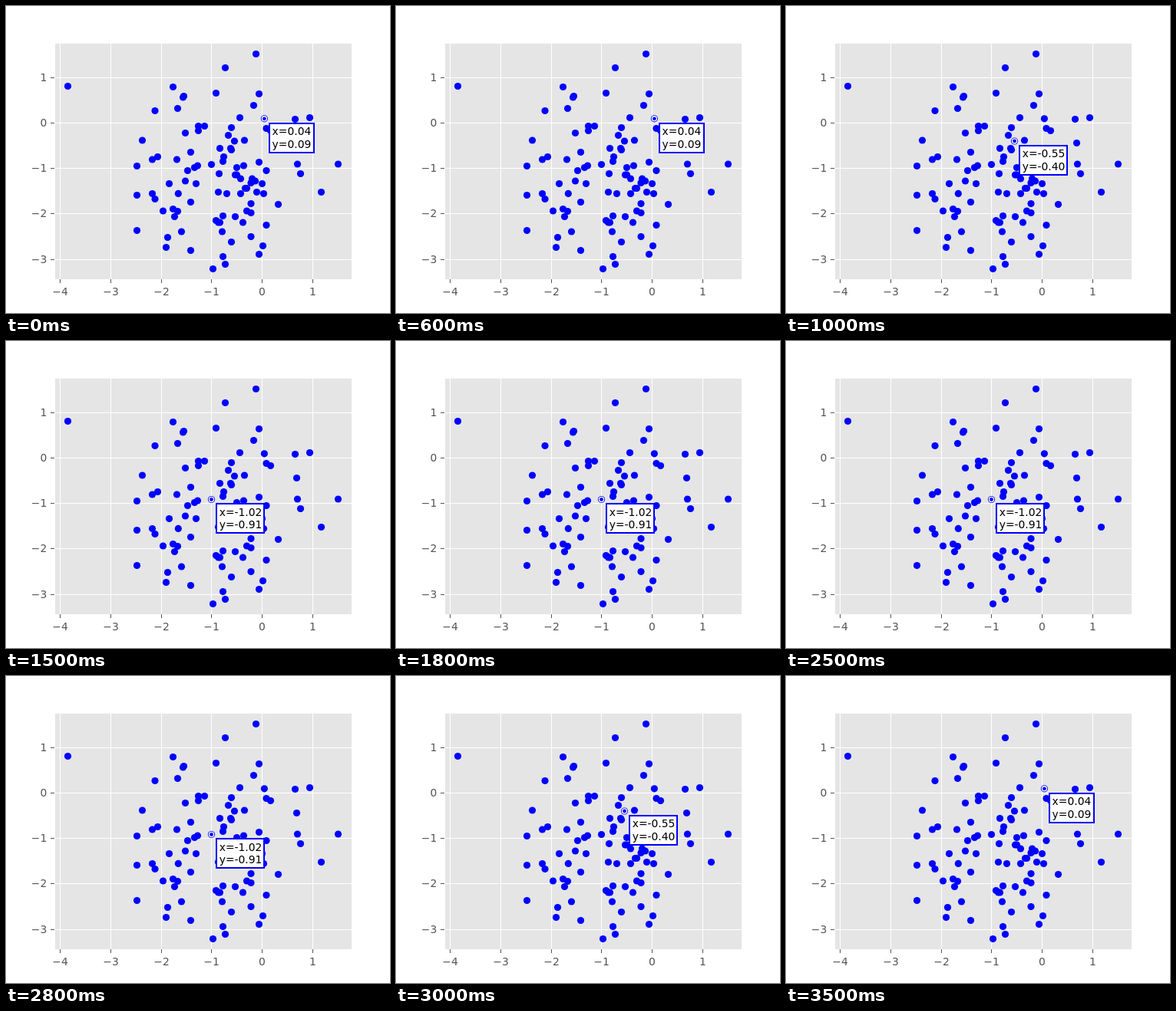
These frames come from a looping animation (500 by 400 pixels, 4000 ms). An HTML page with a canvas:

```html
<!DOCTYPE html>
<html lang="en">
<head>
<meta charset="utf-8">
<title>Scatter plot with a moving data tip</title>
<style>
html, body { margin: 0; width: 100%; height: 100%; overflow: hidden; background: #fff; }
canvas { display: block; }
</style>
</head>
<body>
<canvas id="stage" width="500" height="400"></canvas>
<script>
const ctx = document.getElementById("stage").getContext("2d");
const FONT = '13.89px "DejaVu Sans", sans-serif';
const BLUE = "#00f", GREY = "#555";

// Dots that share a height: y, then every x.
const rows = [
  [62, 325], [104, 80], [113, 273], [117, 231], [118.5, 230], [129, 322],
  [145, 304, 395], [147, 376], [156, 250, 258], [162, 250, 344],
  [165, 233], [168, 289], [174.5, 177, 310], [178, 378], [185, 278, 292],
  [196, 197, 283], [199.5, 190, 222], [205.5, 379, 432], [207.5, 249, 309],
  [210, 245, 300], [214, 236], [218, 277, 383], [219.5, 298, 300],
  [224.5, 305, 320], [227.5, 233, 324], [231, 212, 247, 333],
  [237, 311, 313], [242, 410, 276, 326], [244, 190, 305, 335, 287],
  [258, 354], [266.5, 204, 313], [274, 219, 298], [279, 273],
  [281.5, 276, 278, 308], [293.5, 281, 228], [301, 210], [312, 334],
  [314, 208], [342, 269]
];

// Dots that share a column: x, then every y.
const columns = [
  [285, 80, 336], [240, 190, 255, 318], [282, 202, 273, 326],
  [293, 158, 187, 307], [223, 133, 267], [318.5, 230, 257, 269, 300],
  [193.5, 136, 251], [217, 105, 264], [329, 114, 203, 323],
  [338.5, 159, 214, 285], [170, 208, 246, 292]
];

// Dots visited by the data tip.
const picks = [
  { x: 336.4, y: 146.8, label: ["x=0.04", "y=0.09"], width: 60 },
  { x: 297.5, y: 176, label: ["x=-0.55", "y=-0.40"], width: 64 },
  { x: 267.5, y: 206.5, label: ["x=-1.02", "y=-0.91"], width: 64 },
  { x: 224.3, y: 244.4, label: ["x=-1.67", "y=-1.55"], width: 64 }
];

function box(color, x, y, w, h) {
  ctx.fillStyle = color;
  ctx.fillRect(x, y, w, h);
}

function dot(x, y, r = 4.6, color = BLUE) {
  ctx.fillStyle = color;
  ctx.beginPath();
  ctx.arc(x, y, r, 0, 2 * Math.PI);
  ctx.fill();
}

function text(str, x, y, color, align) {
  ctx.font = FONT;
  ctx.textAlign = align;
  ctx.fillStyle = color;
  ctx.fillText(str, x, y);
}

const tickLabel = n => (n < 0 ? "\u2212" : "") + Math.abs(n);

function drawAxes() {
  box("#fff", 0, 0, 500, 400);
  box("#e5e5e5", 64, 49, 386, 307);
  for (let n = -4; n <= 1; n++) {
    const x = Math.floor(333.7 + 65.8 * n);
    box("#fff", x, 49, 1, 307);
    box(GREY, x, 356, 1, 5);
    text(tickLabel(n), x + 0.5, 377, GREY, "center");
  }
  for (let n = -3; n <= 1; n++) {
    const y = Math.floor(152.4 - 59.2 * n);
    box("#fff", 64, y, 386, 1);
    box(GREY, 58, y, 5, 1);
    text(tickLabel(n), 53.3, y + 5, GREY, "right");
  }
}

function drawTip({ x, y, label, width }) {
  dot(x, y, 3.7, "#fff");
  dot(x, y, 2.4);
  const left = Math.round(x + 5.6), top = Math.round(y + 4.7);
  box(BLUE, left, top, width, 40);
  box("#fff", left + 2, top + 2, width - 4, 36);
  label.forEach((line, i) => text(line, x + 10.2, Math.round(y + 21.2 + 16.6 * i), "#000", "left"));
}

function draw(now) {
  const step = Math.floor(now % 4000 / 500);
  drawAxes();
  for (const [y, ...xs] of rows) xs.forEach(x => dot(x + 0.5, y + 0.5));
  for (const [x, ...ys] of columns) ys.forEach(y => dot(x + 0.5, y + 0.5));
  picks.forEach(p => dot(p.x, p.y));
  // The tip walks down the picks and back up again.
  drawTip(picks[Math.max(0, 3 - Math.abs(4 - step))]);
}

const start = performance.now();
function tick() {
  draw(performance.now() - start);
  requestAnimationFrame(tick);
}
tick();
</script>
</body>
</html>
```
